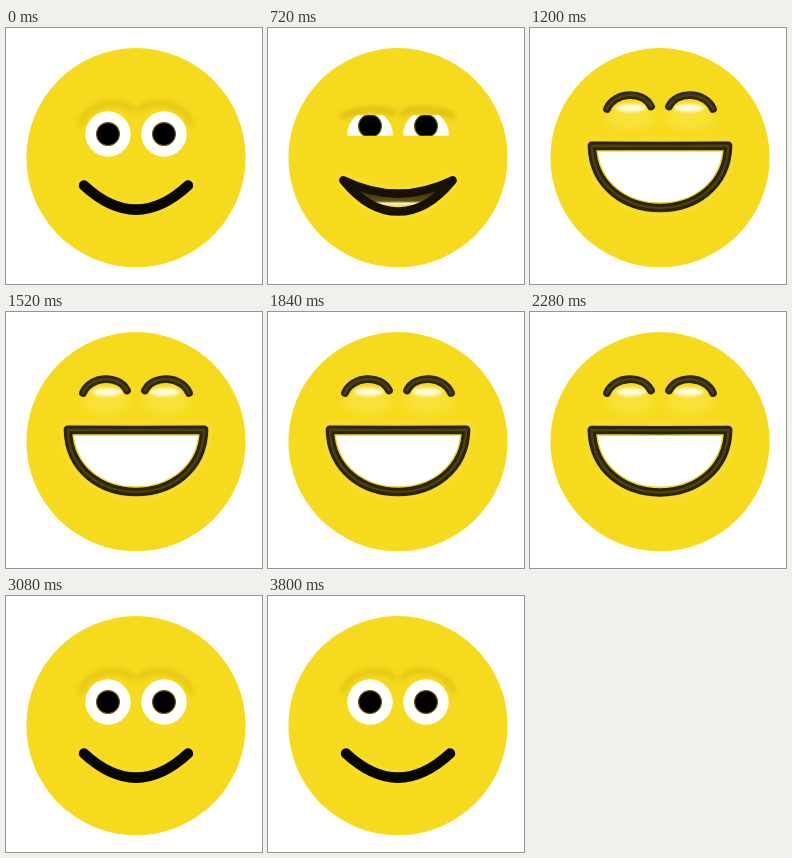
An HTML page for the animation above (3840 ms loop, 256 by 256 pixels).

```html
<!DOCTYPE html>
<html lang="en">
<head>
<meta charset="utf-8">
<title>Laughing face</title>
<style>
html, body { margin: 0; width: 100%; height: 100%; overflow: hidden; background: #fff; }
svg { display: block; width: 100vw; height: 100vh; }
</style>
</head>
<body>
<svg viewBox="0 0 256 256">
  <defs>
    <filter id="soft" x="-40%" y="-80%" width="180%" height="260%"><feGaussianBlur stdDeviation="2.5"/></filter>
    <filter id="glow" x="-40%" y="-80%" width="180%" height="260%"><feGaussianBlur stdDeviation="4"/></filter>
    <filter id="shine" x="-40%" y="-80%" width="180%" height="260%"><feGaussianBlur stdDeviation="1.6"/></filter>
    <linearGradient id="inside" x1="0" y1="0" x2="0" y2="1">
      <stop offset=".35" stop-color="#352c0a"/>
      <stop offset=".66" stop-color="#5b4c12"/>
      <stop offset=".74" stop-color="#fff3b0"/>
      <stop offset=".82" stop-color="#f0d860"/>
    </linearGradient>
    <clipPath id="lids"><rect id="lidBox" x="60" width="140"/></clipPath>
  </defs>
  <circle cx="130" cy="129.7" r="109.6" fill="#f6da1d"/>
  <g id="shade" fill="none" stroke="#d9bb12" stroke-width="6" filter="url(#soft)">
    <path id="shadeL"/><path id="shadeR"/>
  </g>
  <g id="cheeks">
    <g fill="#f9e238" filter="url(#glow)">
      <ellipse cx="100" cy="90" rx="24" ry="12"/>
      <ellipse cx="160" cy="90" rx="24" ry="12"/>
    </g>
    <g fill="#fffbe0" filter="url(#shine)">
      <ellipse cx="101" cy="80" rx="15" ry="4"/>
      <ellipse cx="159" cy="80" rx="15" ry="4"/>
    </g>
  </g>
  <g id="eyes" clip-path="url(#lids)">
    <circle cx="102" cy="106" r="22.7" fill="#fff"/>
    <circle cx="158" cy="106" r="22.7" fill="#fff"/>
    <g id="pupils" stroke="#6a5908" stroke-width="1.2">
      <circle cx="102" r="11.4"/><circle cx="158" r="11.4"/>
    </g>
  </g>
  <g id="arcs" fill="none" stroke-linecap="round">
    <g stroke="#2e260a" stroke-width="7.8"><path id="arcL"/><path id="arcR"/></g>
    <g stroke="#4d410c" stroke-width="2.4"><path id="arcCoreL"/><path id="arcCoreR"/></g>
  </g>
  <path id="halo" fill="none" stroke="#fde84a" stroke-width="13" stroke-linejoin="round" filter="url(#soft)"/>
  <path id="fill" fill="url(#inside)"/>
  <path id="teeth" fill="#fff" stroke="#eed63a" stroke-width="11.5" stroke-linejoin="round"/>
  <path id="lips" fill="none" stroke-linejoin="round" stroke-linecap="round"/>
  <path id="core" fill="none" stroke="#4d410c" stroke-width="2.4" stroke-linejoin="round"/>
</svg>
<script>
const LOOP = 3840, BOB = 320;
const $ = id => document.getElementById(id);
const set = (id, name, value) => $(id).setAttribute(name, value);
const mix = (a, b, k) => a + (b - a) * k;
const clamp = v => Math.min(1, Math.max(0, v));
const mixAll = (a, b, k) => a.map((v, i) => mix(v, b[i], k));

// Linear track through [time, value] pairs
function track(keys, t) {
  let value = keys[0][1];
  for (let i = 1; i < keys.length; i++) {
    const [t0, v0] = keys[i - 1], [t1, v1] = keys[i];
    if (t >= t0) value = mix(v0, v1, clamp((t - t0) / (t1 - t0)));
  }
  return value;
}

// 0 = smile, 1 = half way, 2 = laugh
const MOUTH = [[600, 0], [720, 1], [840, 2], [2770, 2], [2910, 1], [3030, 0]];
const EYES = [[600, 0], [720, 1], [840, 2], [2770, 2], [2840, 1], [2980, 0]];

// half width, corner y, upper sag, lower sag, control inset, line width
const SMILE = [52, 157.5, 24, 24, 0.667, 10.5];
const HALF = [54.5, 152.5, 13.5, 31, 0.62, 8.5];
const LAUGH = [68.2, 117.8, 0.3, 62.4, 0.03, 8.4];
const BIG = [70.5, 122.6, 1, 67.8, 0.03, 8];

function mouthPath([w, y, up, low, inset]) {
  const l = 130 - w, r = 130 + w, d = w * inset;
  const upY = y + up * 4 / 3, lowY = y + low * 4 / 3;
  const flat = w * 0.667;
  return `M${l} ${y}C${l + flat} ${upY} ${r - flat} ${upY} ${r} ${y}` +
    `C${r - d} ${lowY} ${l + d} ${lowY} ${l} ${y}Z`;
}

// Mirrored pair: side -1 is left, 1 is right
function arc(side, bob) {
  const x = d => 130 + side * d;
  const drop = 1.5 * bob;
  return `M${x(53)} ${81 + drop}C${x(46)} ${64 + 3 * bob} ${x(17)} ${62 + 3 * bob} ${x(9)} ${78.5 + drop}`;
}

function brow(side, e) {
  const x = d => 130 + side * d;
  const top = mix(72, 81, e);
  return `M${x(56)} ${mix(98, 90, e)}C${x(50)} ${top} ${x(10)} ${top - 3} ${x(3)} ${mix(84, 87, e)}`;
}

function draw(t) {
  const bob = 0.5 - 1.31 * Math.sin((t - 1180) / BOB * Math.PI * 2);
  const laugh = mixAll(LAUGH, BIG, bob);

  const m = track(MOUTH, t), open = clamp((m - 1) * 2.5);
  const shape = m < 1 ? mixAll(SMILE, HALF, m) : mixAll(HALF, laugh, m - 1);
  const path = mouthPath(shape);
  for (const id of ["halo", "fill", "teeth", "lips", "core"]) set(id, "d", path);
  set("halo", "opacity", mix(0.35, 0.5, m / 2));
  set("teeth", "opacity", open);
  set("core", "opacity", open);
  set("lips", "stroke-width", shape[5]);
  set("lips", "stroke", m < 0.5 ? "#080600" : m < 1.5 ? "#161103" : "#2a2306");

  const e = track(EYES, t), half = clamp(e), shut = clamp(e - 1);
  const lidTop = mix(82, 87, half);
  const lidBottom = e < 1 ? mix(130, 108, e) : mix(108, 84, shut);
  set("lidBox", "y", lidTop);
  set("lidBox", "height", Math.max(0, lidBottom - lidTop));
  set("pupils", "transform", `translate(0 ${mix(106, 98, half)})`);
  set("eyes", "display", shut > 0.85 ? "none" : "inline");

  set("shadeL", "d", brow(-1, half));
  set("shadeR", "d", brow(1, half));
  set("shade", "opacity", mix(0.65, 0.9, half) * (1 - shut));

  for (const id of ["arcL", "arcCoreL"]) set(id, "d", arc(-1, bob));
  for (const id of ["arcR", "arcCoreR"]) set(id, "d", arc(1, bob));
  set("arcs", "opacity", clamp(shut * 2 - 1));
  set("cheeks", "opacity", shut);
  set("cheeks", "transform", `translate(0 ${bob})`);
}

const start = performance.now();
function tick() {
  draw((performance.now() - start) % LOOP);
  requestAnimationFrame(tick);
}
draw(0);
requestAnimationFrame(tick);
</script>
</body>
</html>
```
